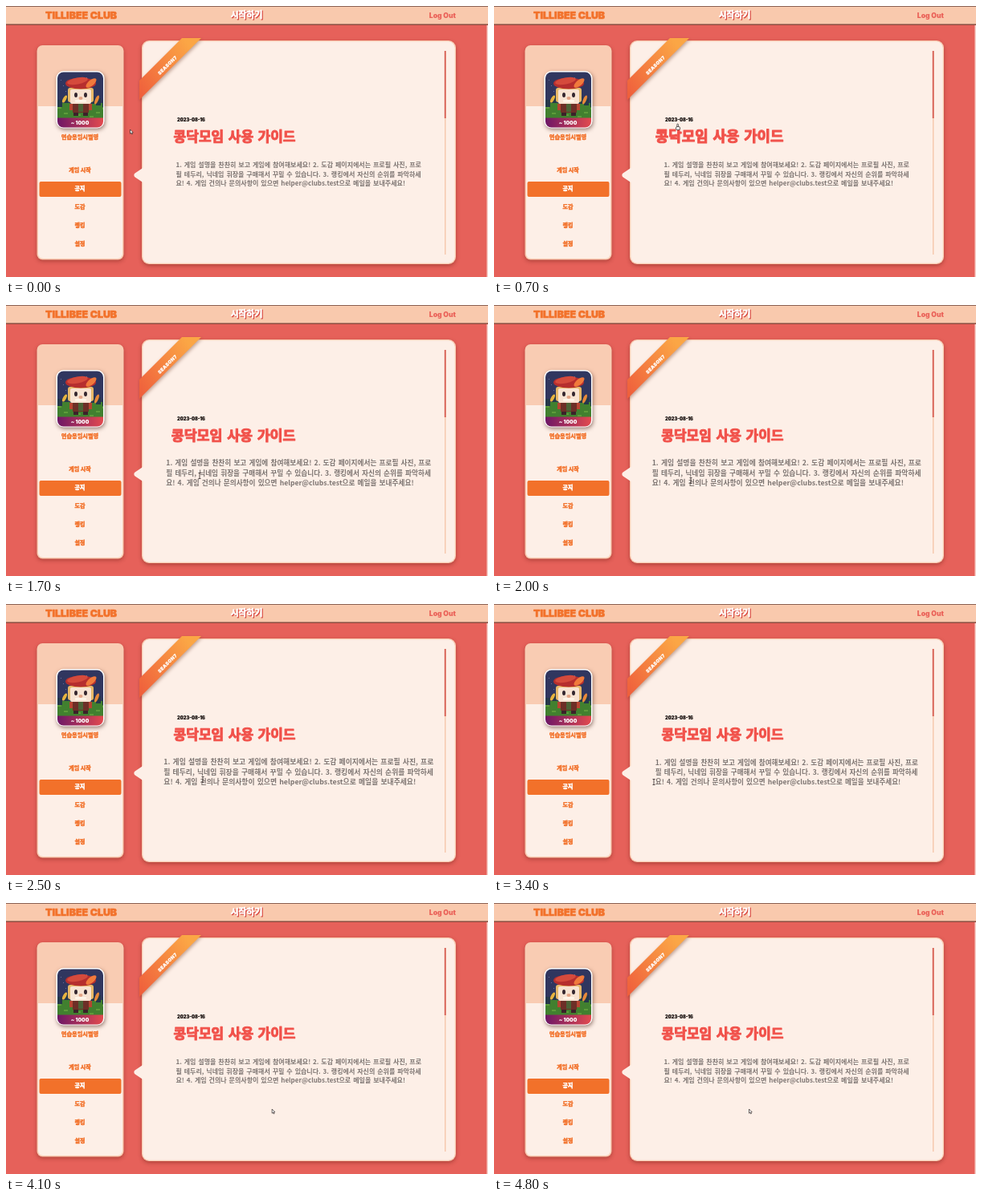
Recreate the animation shown at these times as an HTML page with a canvas. Size 600 by 338 pixels, loop 4.9 s.

```html
<!DOCTYPE html>
<html lang="ko">
<head>
<meta charset="utf-8">
<style>
html, body { margin: 0; width: 100%; height: 100%; overflow: hidden; background: #e6615a; }
canvas { display: block; width: 600px; height: 338px; }
</style>
</head>
<body>
<canvas id="stage" width="600" height="338"></canvas>
<script>
const ctx = document.getElementById('stage').getContext('2d');
const LOOP = 4900, STEP = 100;
const KR = '"Noto Sans CJK KR", "Noto Sans CJK", sans-serif';
const LATIN = 'Inter, sans-serif';
const CREAM = '#fdefe7', PEACH = '#f9ccb3', ORANGE = '#f2712a', RED = '#f1514a';

const PARAGRAPH = [
  '1. 게임 설명을 찬찬히 보고 게임에 참여해보세요! 2. 도감 페이지에서는 프로필 사진, 프로',
  '필 테두리, 닉네임 휘장을 구매해서 꾸밀 수 있습니다. 3. 랭킹에서 자신의 순위를 파악하세',
  '요! 4. 게임 건의나 문의사항이 있으면 helper@clubs.test으로 메일을 보내주세요!'
];
const MENU = ['게임 시작', '공지', '도감', '랭킹', '설정'];

// Moments when the pointer enters and leaves the two texts
const TITLE_IN = 400, BODY_IN = 1200, BODY_OUT = 3200;

// Pointer stops; it glides straight from one to the next
const STOPS = [
  { t: 0, x: 156, y: 157 },
  { t: 700, x: 229, y: 151 },
  { t: 1400, x: 237, y: 207 },
  { t: 2000, x: 245, y: 219 },
  { t: 3100, x: 245, y: 219 },
  { t: 3400, x: 199, y: 222 },
  { t: 3700, x: 360, y: 260 },
  { t: 4300, x: 319, y: 260 }
];

// The standard CSS "ease" curve, solved by bisection
function ease(p) {
  if (p <= 0) return 0;
  if (p >= 1) return 1;
  const axis = (u, a, b) => 3 * a * u * (1 - u) ** 2 + 3 * b * u * u * (1 - u) + u ** 3;
  let lo = 0, hi = 1;
  for (let i = 0; i < 20; i++) {
    const mid = (lo + hi) / 2;
    if (axis(mid, .25, .25) < p) lo = mid; else hi = mid;
  }
  return axis(lo, .1, 1);
}

// Hover zoom over one second, released at `leave`
function zoom(t, enter, leave) {
  const up = ease((Math.min(t, leave) - enter) / 1000);
  return 1 + .1 * up * (1 - ease((t - leave) / 1000));
}

function pointerAt(t) {
  const next = STOPS.findIndex(stop => stop.t > t);
  if (next < 0) return STOPS.at(-1);
  const a = STOPS[next - 1], b = STOPS[next], k = (t - a.t) / (b.t - a.t);
  return { x: a.x + (b.x - a.x) * k, y: a.y + (b.y - a.y) * k };
}

// `heavy` thickens the strokes of the letters
function text(str, x, y, font, color, { align = 'center', gap = 0, heavy = 0 } = {}) {
  ctx.font = font;
  ctx.fillStyle = ctx.strokeStyle = color;
  ctx.textAlign = align;
  ctx.wordSpacing = gap + 'px';
  ctx.lineJoin = 'round';
  ctx.lineWidth = heavy;
  if (heavy) ctx.strokeText(str, x, y);
  ctx.fillText(str, x, y);
}

function rect(x, y, w, h, color) {
  ctx.fillStyle = color;
  ctx.fillRect(x, y, w, h);
}

function round(x, y, w, h, r, color) {
  ctx.beginPath();
  ctx.roundRect(x, y, w, h, r);
  ctx.fillStyle = color;
  ctx.fill();
}

function oval(x, y, rx, ry, color, turn = 0) {
  ctx.beginPath();
  ctx.ellipse(x, y, rx, ry, turn, 0, 2 * Math.PI);
  ctx.fillStyle = color;
  ctx.fill();
}

function poly(points, fill) {
  ctx.beginPath();
  points.forEach(([x, y]) => ctx.lineTo(x, y));
  ctx.closePath();
  ctx.fillStyle = fill;
  ctx.fill();
}

function gradient(x0, y0, x1, y1, from, to) {
  const g = ctx.createLinearGradient(x0, y0, x1, y1);
  g.addColorStop(0, from);
  g.addColorStop(1, to);
  return g;
}

function shadowed(color, blur, dx, dy, draw) {
  ctx.save();
  ctx.shadowColor = color;
  ctx.shadowBlur = blur;
  ctx.shadowOffsetX = dx;
  ctx.shadowOffsetY = dy;
  draw();
  ctx.restore();
}

function scaled(x, y, s, draw) {
  ctx.save();
  ctx.translate(x, y);
  ctx.scale(s, s);
  draw();
  ctx.restore();
}

function panel(x, y, w, h, r) {
  shadowed('rgba(110,30,20,.45)', 5, 0, 2, () => round(x, y, w, h, r, PEACH));
}

function drawHeader() {
  rect(0, 0, 600, 23, '#f9c9ad');
  rect(0, 0, 600, 1, '#8a6355');
  rect(0, 22.5, 600, 1.2, '#714336');
  text('TILLIBEE CLUB', 49, 16, `900 12.4px ${LATIN}`, ORANGE, { align: 'left', heavy: .5 });
  text('시작하기', 300.5, 16, `900 10.8px ${KR}`, '#d63f38', { heavy: .8 });
  text('시작하기', 299.5, 15, `900 10.8px ${KR}`, '#fff', { heavy: .6 });
  text('Log Out', 560, 14.5, `900 8.6px ${LATIN}`, '#ea6158', { align: 'right' });
}

function drawHero() {
  // Parts are placed around the middle of the body
  ctx.save();
  ctx.translate(93, 0);
  for (const side of [-1, 1]) {
    rect(side * 6 - 3, 131, 6, 6, '#3b2229');
    rect(side * 12 - 2, 122, 4, 8, '#b64531');
  }
  rect(-10, 121, 20, 12, '#6d2f27');
  rect(-3, 121, 6, 11, '#4c6336');
  round(-16, 102, 32, 18, 3, '#e8b96a');
  round(-13, 104, 26, 18, 2, '#f8e3d2');
  for (const side of [-1, 1]) oval(side * 6, 111, 2, 3, '#33262e');
  oval(0, 115, 2.5, 2, '#e3a486');
  round(-7, 117, 14, 3, 1, '#fff4e7');
  oval(0, 96.5, 19, 7, '#b62e2e');
  oval(-4, 93.5, 13, 4, '#d54a3c', -.2);
  oval(13, 96, 8, 3.5, '#f17a3c', -.7);
  oval(20, 117, 2, 6, '#e98a3a', .4);
  oval(-20, 116, 2, 5, '#e8b340', .5);
  ctx.restore();
}

function drawAvatar() {
  shadowed('rgba(60,20,10,.5)', 5, 1, 2, () => round(62.5, 81, 60, 71.5, 9, '#fff'));
  ctx.save();
  ctx.beginPath();
  ctx.roundRect(64, 82.5, 57, 69, 7.5);
  ctx.clip();
  rect(64, 82, 57, 40, '#30365f');
  rect(64, 121, 57, 19, '#41802f');
  for (let i = 0; i < 8; i++) {
    rect(65 + i * 29 % 55, 85 + i * 17 % 27, 1, 1, '#66709d');
    rect(64 + i * 8, 117 - i * 5 % 7, 6, 9, '#25384a');
    rect(64 + i * 8, 126 + i * 7 % 12, 5, 2, '#5d9c3a');
  }
  drawHero();
  rect(64, 139.5, 57, 13, gradient(64, 0, 121, 0, '#6e1766', '#e24a4f'));
  text('~ 1000', 92, 148.2, `900 6.5px ${LATIN}`, '#fff');
  ctx.restore();
}

function drawSidebar() {
  panel(38.5, 49, 108, 267.5, 7);
  round(40, 125, 105, 190, [0, 0, 6, 6], CREAM);
  drawAvatar();
  text('연습용임시별명', 92, 166, `900 7.2px ${KR}`, ORANGE, { heavy: .5 });
  round(41.5, 219, 102, 19, 2, ORANGE);
  MENU.forEach((label, i) => text(label, 92, 207.3 + i * 23, `900 7px ${KR}`,
    label === '공지' ? '#fff' : ORANGE, { heavy: .5 }));
}

function drawRibbon() {
  const top = 40, left = 166, near = 219, far = 243;
  const corner = x => [left, top + x - left];
  shadowed('rgba(100,40,20,.4)', 4, 1, 2, () =>
    poly([[near, top], [far, top], corner(far), corner(near)],
      gradient(left, 110, 236, 60, '#ef5f3c', '#fba645')));
  ctx.save();
  ctx.translate(201, 74);
  ctx.rotate(-Math.PI / 4);
  ctx.letterSpacing = '.4px';
  text('SEASON7', 0, 2, `900 5.8px ${LATIN}`, '#fff', { heavy: .2 });
  ctx.restore();
}

function drawCard(t) {
  panel(169, 43, 391, 279, 9);
  round(170.3, 44.3, 388.4, 276.4, 8, CREAM);

  ctx.beginPath();
  ctx.moveTo(171, 201.5);
  ctx.arcTo(157, 211, 171, 220.5, 3);
  ctx.lineTo(171, 220.5);
  ctx.fill();

  rect(546, 56, 1.5, 254, '#f6c9ae');
  rect(545.8, 56, 1.8, 84, '#d65b50');
  drawRibbon();

  text('2023-08-16', 213, 144.2, `900 5.7px ${LATIN}`, '#17100f', { align: 'left', heavy: .2 });
  scaled(360.5, 163, zoom(t, TITLE_IN, BODY_IN), () =>
    text('콩닥모임 사용 가이드', 0, 6, `900 17px ${KR}`, RED, { align: 'right', gap: 1.7, heavy: 1 }));
  scaled(363.5, 210, zoom(t, BODY_IN, BODY_OUT), () =>
    PARAGRAPH.forEach((line, i) =>
      text(line, -152, i * 11.4 - 8.8, `700 8px ${KR}`, '#7d7572', { align: 'left', gap: 1.1 })));
}

function drawPointer(t) {
  const { x, y } = pointerAt(t);
  ctx.save();
  ctx.translate(x, y);
  ctx.lineWidth = .7;
  ctx.strokeStyle = '#2b2424';
  if (t >= TITLE_IN && t < BODY_IN) {
    round(-1.2, -4, 1.6, 6, .8, '#fff');
    ctx.stroke();
    round(-2.5, -.5, 5, 4, 1.5, '#fff');
    ctx.stroke();
  } else if (t >= BODY_IN && t <= BODY_OUT + 200) {
    rect(-.4, -3.5, .8, 7, '#2b2424');
    for (const end of [-1, 1]) rect(-1.5, end * 3.5 - .4, 3, .8, '#2b2424');
  } else {
    poly([[-1.5, -3], [-1.5, 2.2], [-.3, 1.2], [.6, 3], [1.4, 2.6], [.6, .9], [2.2, .8]], '#fff');
    ctx.stroke();
  }
  ctx.restore();
}

function render(now) {
  const t = Math.floor(now % LOOP / STEP) * STEP;
  rect(0, 0, 600, 338, '#e6615a');
  drawHeader();
  rect(598.5, 24, 1.5, 314, '#f7d5cf');
  drawSidebar();
  drawCard(t);
  drawPointer(t);
}

let start;
function tick(now) {
  start ??= now;
  render(now - start);
  requestAnimationFrame(tick);
}
render(0);
requestAnimationFrame(tick);
</script>
</body>
</html>
```
